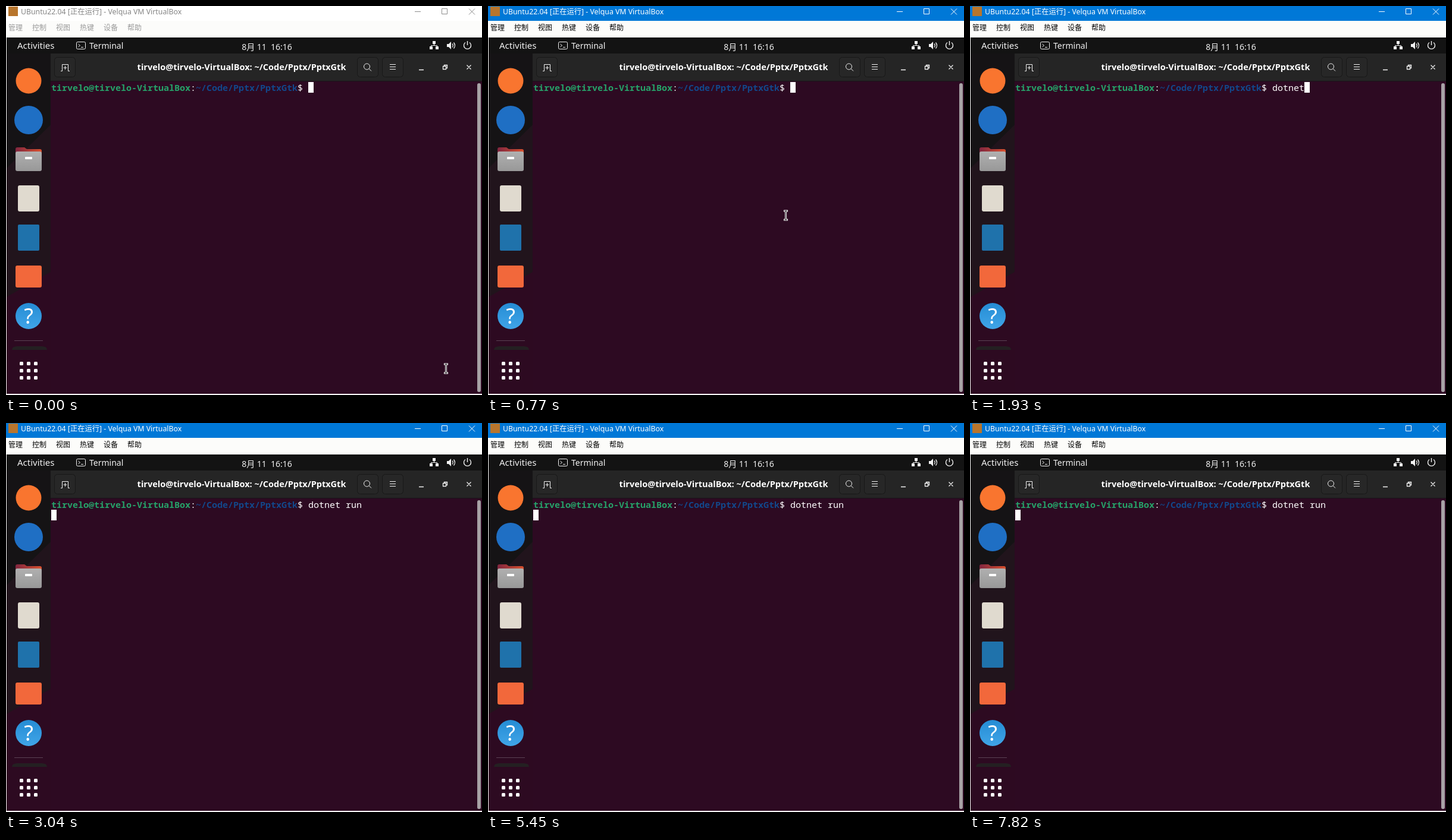
An HTML page that plays this animation: 800 by 655 pixels, repeating every 8 s.

```html
<!DOCTYPE html>
<html lang="zh-CN">
<head>
<meta charset="utf-8">
<title>Terminal session</title>
<style>
html, body { margin: 0; width: 100%; height: 100%; overflow: hidden; background: #fff; }
svg { display: block; width: 800px; height: 655px; }
text { white-space: pre; font-family: "Noto Sans", "Noto Sans CJK SC", "Noto Sans CJK", sans-serif; }
.line { fill: none; stroke: #f2f2f2; }
.button { fill: #272727; stroke: #181818; }
.panel { fill: #f2f2f2; }
.mono { font: 15px "Noto Sans Mono", "DejaVu Sans Mono", monospace; fill: #fff; }
.bold { font-weight: 700; }
#titleBar { fill: #fff; }
#title { font-size: 12.3px; fill: #858585; }
#controls { fill: none; stroke: #8c8c8c; }
#menu { font-size: 12px; fill: #999; }
.focused #titleBar { fill: #0078d7; }
.focused #title { fill: #fff; }
.focused #controls { stroke: #fff; }
.ready #menu { fill: #000; }
</style>
</head>
<body>
<svg id="stage" viewBox="0 0 800 655">
  <defs>
    <linearGradient id="gray" x2="0" y2="1"><stop stop-color="#b0b0b0"/><stop offset="1" stop-color="#989898"/></linearGradient>
    <linearGradient id="folder"><stop stop-color="#80263f"/><stop offset="1" stop-color="#d9502e"/></linearGradient>
    <linearGradient id="help" x2="0" y2="1"><stop stop-color="#258cd4"/><stop offset="1" stop-color="#40a5e8"/></linearGradient>
  </defs>

  <!-- Host window -->
  <rect width="800" height="655" fill="#fcfcfa"/>
  <rect id="titleBar" width="800" height="25"/>
  <rect x="4" y="1" width="16" height="16" fill="#b8752c"/>
  <text id="title" x="25" y="14">UBuntu22.04 [正在运行] - Velqua VM VirtualBox</text>
  <path id="controls" d="M687 9.5h10M732.5 4.5h9v9h-9zM778 4.5l10 10M788 4.5l-10 10"/>
  <g id="menu"></g>

  <!-- Guest desktop and dock -->
  <rect x="1" y="53" width="799" height="600" fill="#2d0a21"/>
  <path d="M1 80H75V448L60 456 1 490Z" fill="#21141c"/>
  <path d="M1 80H75V200L1 273Z" fill="#151315"/>
  <rect x="1" y="53" width="799" height="27" fill="#131313"/>

  <circle cx="38" cy="126" r="21.5" fill="#f9752f"/>
  <circle cx="38" cy="192" r="24" fill="#1f6fc4"/>
  <path d="M16 250V241q0-3 3-3h12l4 3h22q3 0 3 3v10z" fill="url(#folder)"/>
  <rect x="16" y="245" width="44" height="33" rx="3" fill="url(#gray)"/>
  <rect x="32" y="254" width="12" height="4" rx="1" fill="#fff"/>
  <rect x="20" y="302" width="36" height="44" rx="3" fill="#e0dacf"/>
  <rect x="20" y="368" width="36" height="44" rx="2" fill="#1f72ab"/>
  <rect x="16" y="437" width="44" height="37" rx="3" fill="#f2683b"/>
  <circle cx="38" cy="522" r="22" fill="url(#help)"/>
  <text x="38" y="535" font-size="36" fill="#fff" text-anchor="middle">?</text>
  <path d="M14 563.5H62" stroke="#5b4254"/>
  <path d="M10 579q0-6 9-6h41q9 0 9 6z" fill="#242022"/>
  <g id="apps" fill="#fff"></g>

  <!-- Desktop panel -->
  <g class="panel">
    <text x="19" y="72" font-size="15">Activities</text>
    <text x="140" y="72" font-size="14">Terminal</text>
    <text x="438.5" y="74" font-size="14" text-anchor="middle">8月 11  16:16</text>
    <path d="M717 59h5v5h-5zM712 68h5v5h-5zM722 68h5v5h-5zM741 64h3l4-4v13l-4-4h-3z"/>
  </g>
  <g class="line">
    <rect x="118.5" y="60.5" width="15" height="12" rx="2"/>
    <path d="M121.5 64l3 2.5-3 2.5M126 69.5h4M719.5 64v2.5M714.5 68v-1.5h10v1.5"/>
    <path d="M750 63.5q2.5 3 0 6M752.5 61.5q4 5 0 10" stroke-width="1.3"/>
    <path d="M772 61.5a6 6 0 1 0 7 0M775.5 59v7" stroke-width="1.4"/>
  </g>

  <!-- Terminal window -->
  <rect x="75" y="80" width="725" height="46" fill="#252525"/>
  <path d="M75 126.5H800" stroke="#191519"/>
  <rect x="75" y="127" width="725" height="526" fill="#2d0a22"/>
  <rect x="792" y="130" width="6" height="520" rx="3" fill="#a7a1a5"/>
  <rect class="button" x="81.500" y="86.500" width="35" height="33" rx="5"/>
  <rect class="button" x="590.5" y="86.5" width="35" height="33" rx="5"/>
  <rect class="button" x="632.5" y="86.5" width="35" height="33" rx="5"/>
  <g class="line">
    <path d="M92 109.500h2.500v-11h10v11h2.500M99.500 101v6M96.500 104h6"/>
    <circle cx="606.500" cy="102" r="5"/>
    <path d="M610 105.500l4 4M645 98.500h10M645 102.500h10M645 106.500h10"/>
    <path d="M694 107.500h8M734.500 101.500h5v5h-5zM736.500 101.500v-2h5v5h-2M774.500 99.500l7 7M781.500 99.500l-7 7" stroke-width="1.3"/>
  </g>
  <text x="396" y="108" class="bold" font-size="14.5" fill="#fff" text-anchor="middle">tirvelo@tirvelo-VirtualBox: ~/Code/Pptx/PptxGtk</text>

  <text class="mono bold" x="76" y="143" fill="#26a269" style="fill:#26a269">tirvelo@tirvelo-VirtualBox</text>
  <text class="mono" x="310" y="143">:</text>
  <text class="mono bold" x="319" y="143" style="fill:#12488b">~/Code/Pptx/PptxGtk</text>
  <text class="mono" x="490" y="143">$</text>
  <text class="mono" x="508" y="143" id="command"></text>
  <rect id="caret" width="9" height="18" fill="#fff"/>

  <g id="pointer">
    <circle id="click" r="12" fill="#8f7d12"/>
    <g fill="none">
      <path d="M-3.500-7.500h7M-3.500 7.500h7M0-7.500v15" stroke="#fff" stroke-width="3"/>
      <path d="M-2.500-7.500h5M-2.500 7.500h5M0-7.500v15" stroke="#151015"/>
    </g>
  </g>
</svg>
<script>
const byId = id => document.getElementById(id);
const [stage, caret, pointer, click, command] =
  ["stage", "caret", "pointer", "click", "command"].map(byId);

const DURATION = 8000;
const CELL = 9;
const COMMAND = "dotnet run";
const keyTimes = [1450, 1580, 1650, 1790, 1860, 1930, 2350, 2490, 2560, 2770];
const enterTime = 3040;
const blinkTimes = [140, 770, 1380, 1450, 3580, 4200, 4830, 5450, 6050, 6660, 7280, 7820];
const pointerStops = [
  [0, 739.5, 610.5], [70, 622, 480], [140, 504.5, 349],
  [420, 502.5, 351], [490, 500.5, 352.5]
];

byId("menu").innerHTML = ["管理", "控制", "视图", "热键", "设备", "帮助"]
  .map((label, i) => `<text x="${4 + i * 40}" y="41">${label}</text>`).join("");
byId("apps").innerHTML = Array.from({ length: 9 }, (_, i) =>
  `<rect x="${23 + i % 3 * 12}" y="${599 + Math.floor(i / 3) * 12}" width="6" height="6" rx="1.5"/>`).join("");

const countPast = (times, t) => times.filter(time => time <= t).length;
const show = (element, visible) => element.setAttribute("visibility", visible ? "visible" : "hidden");

function render(t) {
  stage.classList.toggle("focused", t >= 210);
  stage.classList.toggle("ready", t >= 280);

  const typed = countPast(keyTimes, t);
  const entered = t >= enterTime;
  command.textContent = COMMAND.slice(0, typed);
  caret.setAttribute("x", entered ? 76 : 508 + typed * CELL);
  caret.setAttribute("y", entered ? 146 : 128);
  show(caret, countPast(blinkTimes, t) % 2 === 0);

  const [, x, y] = pointerStops.filter(([time]) => time <= t).pop();
  pointer.setAttribute("transform", `translate(${x} ${y})`);
  pointer.setAttribute("display", t < keyTimes[0] ? "inline" : "none");
  show(click, t >= 210 && t < 280);
}

const start = performance.now();
function frame() {
  render((performance.now() - start) % DURATION);
  requestAnimationFrame(frame);
}
frame();
</script>
</body>
</html>
```
